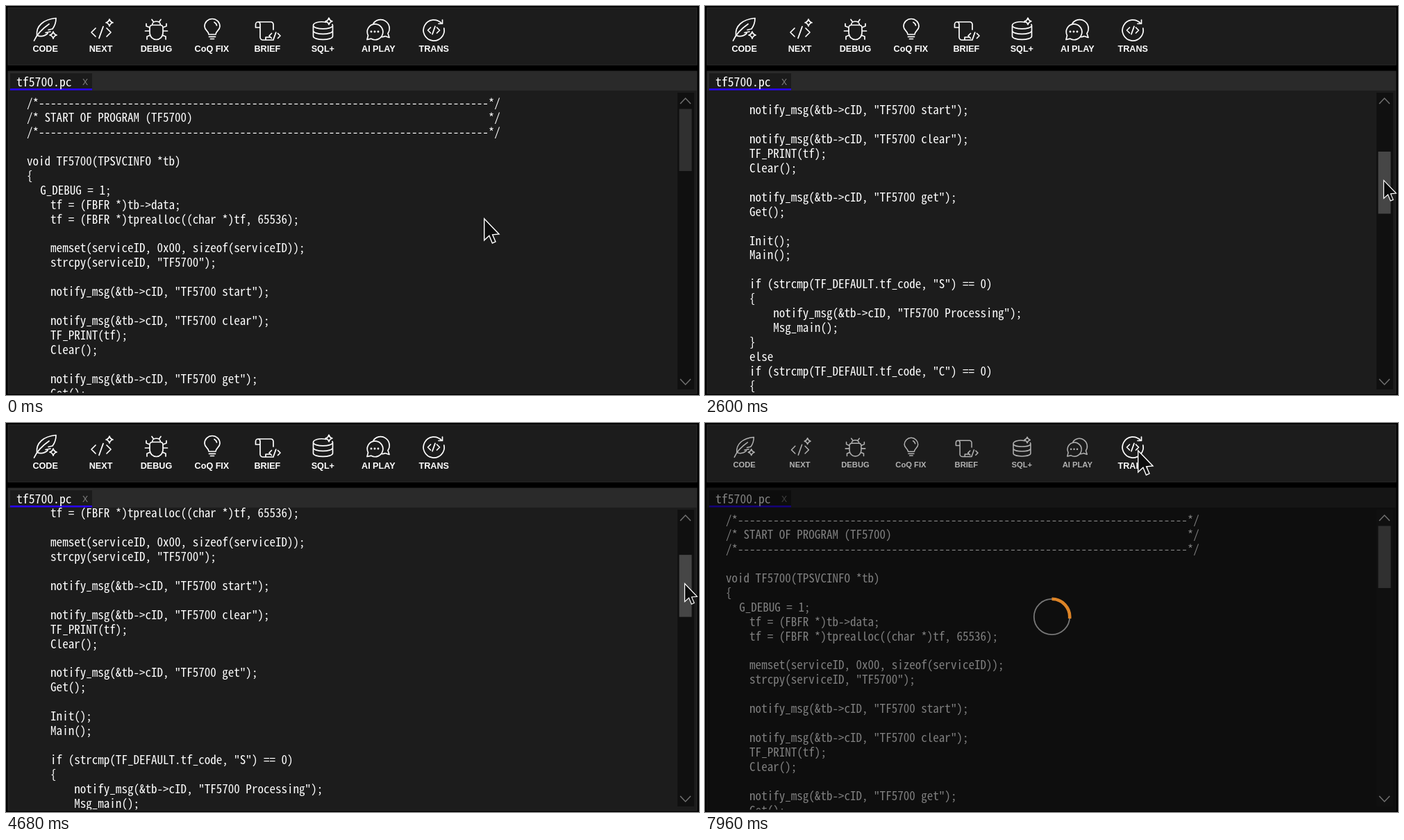
An HTML page for the animation above (8000 ms loop, 998 px wide and 561 px high).

```html
<!DOCTYPE html>
<html lang="en">
<head>
<meta charset="utf-8">
<title>Code editor</title>
<style>
html, body { margin: 0; width: 100%; height: 100%; overflow: hidden; background: #000; }
svg { display: block; width: 100%; height: 100%; }
text { white-space: pre; fill: #fff; }
.mono { font-family: "Noto Sans Mono CJK KR", "Noto Sans Mono CJK JP", "Noto Sans Mono CJK SC", "Noto Sans Mono", monospace; font-variant-ligatures: none; }
.label { font: bold 12.6px "Liberation Sans", Arial, sans-serif; text-anchor: middle; }
.icon { fill: none; stroke: #fff; stroke-width: 1.7; stroke-linecap: round; stroke-linejoin: round; }
.chevron { fill: none; stroke: #707070; stroke-width: 1.5; }
</style>
</head>
<body>
<svg viewBox="0 0 998 561">
  <defs>
    <clipPath id="view"><rect x="4" y="122" width="963" height="435.5"/></clipPath>
  </defs>
  <rect width="998" height="561"/>
  <rect x="3" y="2.5" width="992" height="82.5" fill="#1c1c1c" stroke="#2a2a2a"/>
  <g id="tools"></g>
  <g id="hint" stroke="#e08a26" stroke-width="2.2" fill="none">
    <circle id="ring" cx="616" cy="44.5" r="38"/>
    <g id="callout">
      <path d="M660.5 45 685 20V31H836V59H685V69.5Z" fill="#2b2828"/>
      <text id="tip" class="mono" x="688" y="50" stroke="none">TRANS Icon Click</text>
    </g>
  </g>

  <rect x="3" y="94" width="992" height="465" fill="#1c1c1c" stroke="#2a2a2a"/>
  <rect x="3" y="94" width="992" height="28" fill="#2a2a2a"/>
  <rect x="6" y="97" width="118" height="25" fill="#1b1b1b"/>
  <rect x="6" y="119" width="118" height="2.6" fill="#2a06f0"/>
  <text id="tab" class="mono" x="15" y="115.5">tf5700.pc</text>
  <text x="110" y="113.5" style="font: 12px Inter, sans-serif; fill: #808080">X</text>
  <g clip-path="url(#view)">
    <rect id="hover" x="4" width="963" height="21" fill="#313131"/>
    <g id="code" class="mono"></g>
  </g>
  <rect id="shade" x="3" y="93.5" width="993" height="466"/>

  <rect x="967" y="125" width="24" height="428" fill="#101010"/>
  <rect id="thumb" x="969.5" y="148.5" width="18" height="89.5"/>
  <path class="chevron" d="M971 141 978.5 133 986 141M971 538 978.5 546 986 538"/>

  <g id="spinner" fill="none">
    <circle cx="499.5" cy="279.5" r="25.7" stroke="#777" stroke-width="1.8"/>
    <path d="M499.5 253.8A25.7 25.7 0 0 1 525.1 282" stroke="#dd8427" stroke-width="4.6"/>
  </g>
  <path id="cursor" d="M.7 1.7V32.8L7.9 26.3 12.4 37 17 35 12.6 24.8 22 24Z" fill="#0c0c0c" stroke="#fff" stroke-width="1.4"/>
</svg>
<script>
const NS = "http://www.w3.org/2000/svg";
const $ = id => document.getElementById(id);
const LOOP = 8000, STEP = 40;
const ROW = 20.947, COL = 8.525, TOP = 140;
const SCROLL = 1241, TRAVEL = 291;

function add(parent, tag, attrs, text) {
  const el = document.createElementNS(NS, tag);
  for (const k in attrs) el.setAttribute(k, attrs[k]);
  if (text) el.textContent = text;
  return parent.appendChild(el);
}

// Font size that gives one column the wanted width
function fit(el, col) {
  const ctx = document.createElement("canvas").getContext("2d");
  ctx.font = "100px " + getComputedStyle(el).fontFamily;
  el.style.fontSize = col / ctx.measureText("0").width * 100 + "px";
}

// ---- toolbar ----
const star = (x, y, r) =>
  `M${x} ${y - r}q1 ${r - 1} ${r} ${r}q${1 - r} 1 ${-r} ${r}q-1 ${1 - r} ${-r} ${-r}q${r - 1} -1 ${r} ${-r}z`;
const tag = (x, y, w, h) =>
  `M${x - w + h} ${y - h}l${-h} ${h} ${h} ${h}M${x + w - h} ${y - h}l${h} ${h} ${-h} ${h}` +
  `M${x + h * .5} ${y - h * 1.4}L${x - h * .5} ${y + h * 1.4}`;
const disc = (x, y, r) => `M${x - r} ${y}a${r} ${r} 0 1 0 ${2 * r} 0a${r} ${r} 0 1 0 ${-2 * r} 0`;

const icons = [
  ["CODE", "M40.5 50C44 42 52 33 62 26M44.5 42.5C43 29 54 19 72 17.5C72 23 70 29 67 33M45 42.5C51 45 56 43 60 39.5M67 33L61 34.5M64 37L57 38.5" + star(68, 42, 5)],
  ["NEXT", tag(137, 38, 14, 6) + star(149, 24, 5)],
  ["DEBUG", "M207 31.5C207 28.5 209 27.5 211 27.5H222C224 27.5 226 28.5 226 31.5V39A9.5 9.5 0 0 1 207 39ZM210.5 27.5C210.5 20.5 222.5 20.5 222.5 27.5M210 19.5 212.5 23M223 19.5 220.5 23M207 36H200.5M226 36H232.5M207 31 202 29V25.5M226 31 231 29V25.5M208 42 203 44V48M225 42 230 44V48"],
  ["CoQ FIX", "M292 41C292 36 286 35 286 29.5A11 11 0 0 1 308 29.5C308 35 302 36 302 41ZM292.5 44.3H301.5M294.5 47.5H299.5M300 23.5C302 24.5 303 26 303.5 28"],
  ["BRIEF", "M365 31H359.5V26.5A3.5 3.5 0 0 1 363 23H381.5A3.5 3.5 0 0 1 385 26.5V34M363 23A3.5 3.5 0 0 1 366 26.5V45A4 4 0 0 0 370 49H385M374 49V45H380" + tag(387, 43, 8, 3.5)],
  ["SQL+", "M461 23.5C452 21.5 442.5 24 442.5 28C442.5 34.5 470.5 34.5 470.5 28L470 26.5M442.5 28V43.5C442.5 50 470.5 50 470.5 43.5V28M442.5 35.5C442.5 42 470.5 42 470.5 35.5" + star(465, 22, 4.8)],
  ["AI PLAY", "M520 48.5 521.5 42.5A11.3 11.3 0 1 1 526 47.2ZM529 25.3A12 12 0 1 1 550 39.5L552 45.5 546 43.5C544.5 44.3 543 44.6 541 44.7" + disc(526, 37, .6) + disc(531, 37, .6) + disc(536, 37, .6)],
  ["TRANS", "M627.5 25.3A15 15 0 1 0 630.8 32M628.5 20V25.5H623" + tag(616, 35, 8.5, 4)]
];
const tools = icons.map(([name, d], i) => {
  const x = 56.6 + 79.95 * i, g = add($("tools"), "g", {});
  add(g, "path", { class: "icon", d });
  add(g, "text", { class: "label", x, y: 66.3 }, name);
  return { g, x };
});

// ---- program text ----
const rule = "/*" + "-".repeat(76) + "*/";
const banner = s => [rule, ("/* " + s).padEnd(78) + "*/", rule];
const note = s => `notify_msg(&tb->cID, "TF5700 ${s}");`;
const test = c => `if (strcmp(TF_DEFAULT.tf_code, "${c}") == 0)`;
const pad = (n, rows) => rows.map(r => r && " ".repeat(n) + r);
const block = rows => ["{", ...pad(4, rows), "}"];
const copy = block(["memset(&CPTF, 0x00, sizeof(CPTF));", "strcpy(CPTF.ref_no, TF57.ref_no);"]);

const lines = [
  ...banner("START OF PROGRAM (TF5700)"), "",
  "void TF5700(TPSVCINFO *tb)", "{", "\tG_DEBUG = 1;",
  ...pad(4, [
    "tf = (FBFR *)tb->data;", "tf = (FBFR *)tprealloc((char *)tf, 65536);", "",
    "memset(serviceID, 0x00, sizeof(serviceID));", 'strcpy(serviceID, "TF5700");', "",
    note("start"), "",
    note("clear"), "TF_PRINT(tf);", "Clear();", "",
    note("get"), "Get();", "",
    "Init();", "Main();", "",
    test("S"), ...block([note("Processing"), "Msg_main();"]), "else",
    test("C"), ...block([note("Confirm"), "Msg_main();"]), "",
    note("put"), "Put();", "",
    note("end"), "TF_PRINT(tf);", "tpreturn(TPSUCCESS, 0, (char *)tf, 0, 0);"
  ]),
  "}", "", "void Msg_main()", "{",
  ...pad(4, [
    "int rc = 0;", "", "memset(&TF57, 0x00, sizeof(TF57));", "rc = Read_msg(&TF57);", "",
    "if (rc < 0)", ...block(["notify_msg(&tb->cID, tf_errmsg);", "TF_ERR(tf_errmsg, 1);", "Clear();", "return;"]), "",
    test("S"), ...copy, "else " + test("C"), ...copy, "",
    "if (check(&CPTF) < 0) {", "    TF_ERR(tf_errmsg, 9);", "}"
  ]),
  "}", "", ...banner("END OF PROGRAM (TF5700)")
];
lines.forEach((s, i) => {
  const body = s.trimStart();
  const indent = s[0] === "\t" ? 2.25 : s.length - body.length;
  if (body) add($("code"), "text", { x: 30 + indent * COL, y: TOP + 6 + i * ROW }, body);
});
fit($("code"), COL);
fit($("tab"), 8.85);
fit($("tip"), 8.55);

// ---- motion ----
const ramp = (t, a, b) => Math.min(1, Math.max(0, (t - a) / (b - a)));
const smooth = (t, a, b) => { const u = ramp(t, a, b); return u * u * (3 - 2 * u); };
const bez = (u, a, b, c, d) => {
  const v = 1 - u;
  return a * v * v * v + 3 * b * u * v * v + 3 * c * u * u * v + d * u * u * u;
};
const quad = (u, a, b, c) => a * (1 - u) ** 2 + 2 * b * u * (1 - u) + c * u * u;

function pointer(t, drag) {
  if (t < 1560) {
    const u = (1 - Math.cos(Math.PI * ramp(t, 680, 1520))) / 2;
    return [quad(u, 688, 752, 968.5), quad(u, 305, 213, 185.5)];
  }
  if (t <= 5800) return [975, 185.5 + drag];
  const u = ramp(t, 5800, 7320);
  return [bez(u, 975, 955, 690, 623), bez(u, 185.5, 258, -25, 38)];
}

function draw(t) {
  const pos = smooth(t, 2280, 3360) - smooth(t, 4040, 4880);
  const drag = TRAVEL * pos;
  const [x, y] = pointer(t, drag);
  const press = ramp(t, 1960, 2200) - ramp(t, 5040, 5240)
    + ramp(t, 7480, 7600) - ramp(t, 7640, 7760);
  const s = 1 - .16 * press;
  $("cursor").setAttribute("transform",
    `translate(${x + 11.5 * (1 - s)} ${y + 18.5 * (1 - s)}) scale(${s})`);

  $("code").setAttribute("transform", `translate(0 ${-SCROLL * pos})`);
  $("thumb").setAttribute("transform", `translate(0 ${drag})`);
  $("thumb").setAttribute("fill", t >= 1560 && t < 5920 ? "#464646" : "#303030");

  const moving = t >= 720 && t < 1520 || t > 5880 && t < 7320;
  const row = Math.floor((y - TOP + ROW / 2) / ROW);
  $("hover").setAttribute("visibility", moving && x < 967 && row >= 0 ? "visible" : "hidden");
  $("hover").setAttribute("y", TOP - 10 + row * ROW + 1.2);

  // toolbar focus on the last icon
  const out = ramp(t, 6720, 7120);
  const dim = ramp(t, 5040, 5440) - out;
  const load = ramp(t, 7600, 7920);
  tools.forEach(({ g, x }, i) => {
    if (i === tools.length - 1) return;
    const k = 1 - .11 * load;
    g.setAttribute("opacity", 1 - .86 * dim - .34 * load);
    g.setAttribute("transform", `translate(${x * (1 - k)} ${44 * (1 - k)}) scale(${k})`);
  });
  const ring = ramp(t, 5160, 5480);
  $("hint").setAttribute("opacity", 1 - out);
  $("ring").setAttribute("opacity", ring);
  $("ring").setAttribute("r", 38 + 8 * (1 - smooth(t, 5160, 5480)));
  $("callout").setAttribute("opacity", ramp(t, 5400, 5760));

  $("shade").setAttribute("opacity", .5 * load);
  $("spinner").setAttribute("opacity", load);
}

let start;
function frame(now) {
  start ??= now;
  draw(Math.floor((now - start) % LOOP / STEP) * STEP);
  requestAnimationFrame(frame);
}
draw(0);
requestAnimationFrame(frame);
</script>
</body>
</html>
```
